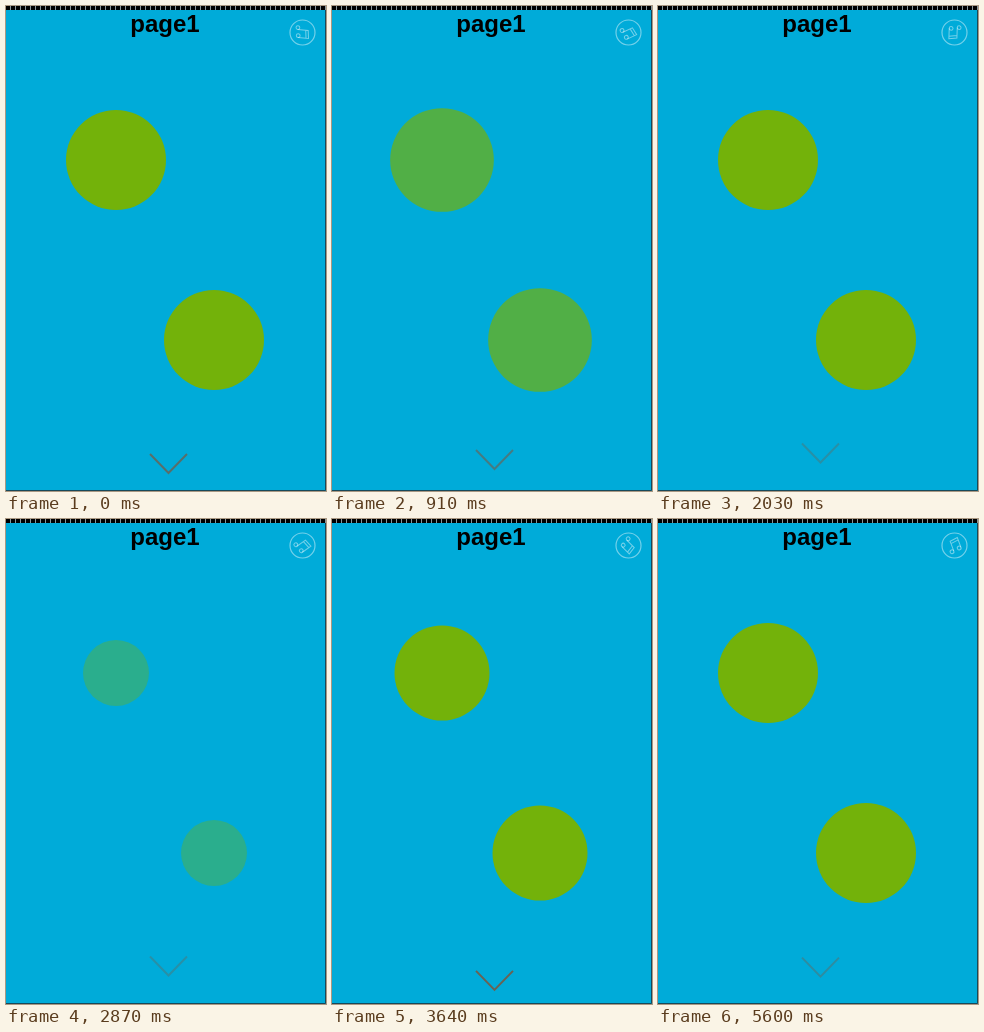
These frames come from a looping animation (320 by 485 pixels, 5.67 s). An HTML page:

```html
<!DOCTYPE html>
<html lang="en">
<head>
<meta charset="utf-8">
<title>page1</title>
<style>
  html, body { margin: 0; width: 100%; height: 100%; overflow: hidden; background: #00abd9; }
  svg { display: block; }
  text { font: bold 24px "Liberation Sans", Arial, sans-serif; text-anchor: middle; }
  .line { fill: none; stroke: #fff; stroke-opacity: .45; }
</style>
</head>
<body>
<svg width="320" height="485" viewBox="0 0 320 485">
  <defs>
    <pattern id="ticks" width="5" height="4" patternUnits="userSpaceOnUse">
      <path d="M0 0h5v4h-5z"/>
      <path d="M4 0h1v4h-1z" fill="#8a979b"/>
    </pattern>
  </defs>
  <path d="M0 0h320v485h-320z" fill="#00abd9"/>
  <path d="M0 0h320v4h-320z" fill="url(#ticks)"/>
  <path d="M319.5 4V484.5H0" fill="none" stroke="#17495a"/>
  <text x="159" y="26">page1</text>
  <g id="dots" fill="#73b20a">
    <circle cx="110" cy="154" r="50"/>
    <circle cx="208" cy="334" r="50"/>
  </g>
  <circle class="line" cx="296.5" cy="26.5" r="12.5" stroke-width="1.2"/>
  <g id="note" class="line">
    <circle cx="-4.5" cy="5" r="1.9"/>
    <circle cx="3.5" cy="4" r="1.9"/>
    <path d="M-2.6 5V-5.5L5.4-6.5V4M-2.6-3L5.4-4"/>
  </g>
  <path id="arrow" d="M-18.5-19L0 0L18.5-19" fill="none" stroke="#865032" stroke-width="2"/>
</svg>
<script>
const LOOP = 5670, STEP = 70;
const SPIN = .1044;   // degrees per ms
const BOB = 1420;     // ms per arrow cycle
const $ = id => document.getElementById(id);

// Each replay hides the dots, skips the note and arrow ahead, then bounces the dots in
const replays = [
  { hide: 140, skip: 280, turn: 235, shift: 380, start: 480 },
  { hide: 2310, skip: 2450, turn: 145, shift: 530, start: 2650 },
];
const bounce = [[20, .3], [465, 1.1], [800, .9], [1180, 1]];

function scaleAt(age) {
  const next = bounce.findIndex(([time]) => age < time);
  if (next < 0) return 1;
  if (next === 0) return bounce[0][1];
  const [t0, a] = bounce[next - 1], [t1, b] = bounce[next];
  return a + (b - a) * (age - t0) / (t1 - t0);
}

function draw(now) {
  const t = Math.floor(now % LOOP / STEP) * STEP;
  let age = Infinity, angle = 95 + SPIN * t, clock = t + 460;
  for (const { hide, skip, turn, shift, start } of replays) {
    if (t >= hide) age = t - start;
    if (t >= skip) {
      angle += turn;
      clock += shift;
    }
  }

  for (const dot of $("dots").children) {
    dot.setAttribute("r", 50 * scaleAt(age));
    dot.setAttribute("opacity", Math.min(1, Math.max(0, age / 605)));
  }
  $("note").setAttribute("transform", `translate(296.5 26.5) rotate(${angle})`);

  const wave = (1 - Math.cos(2 * Math.PI * clock / BOB)) / 2;
  $("arrow").setAttribute("transform", `translate(162.5 ${456.5 + 14.5 * wave})`);
  $("arrow").setAttribute("opacity", .3 + .5 * wave);
}

const begin = performance.now();
function tick() {
  draw(performance.now() - begin);
  requestAnimationFrame(tick);
}
tick();
</script>
</body>
</html>
```
